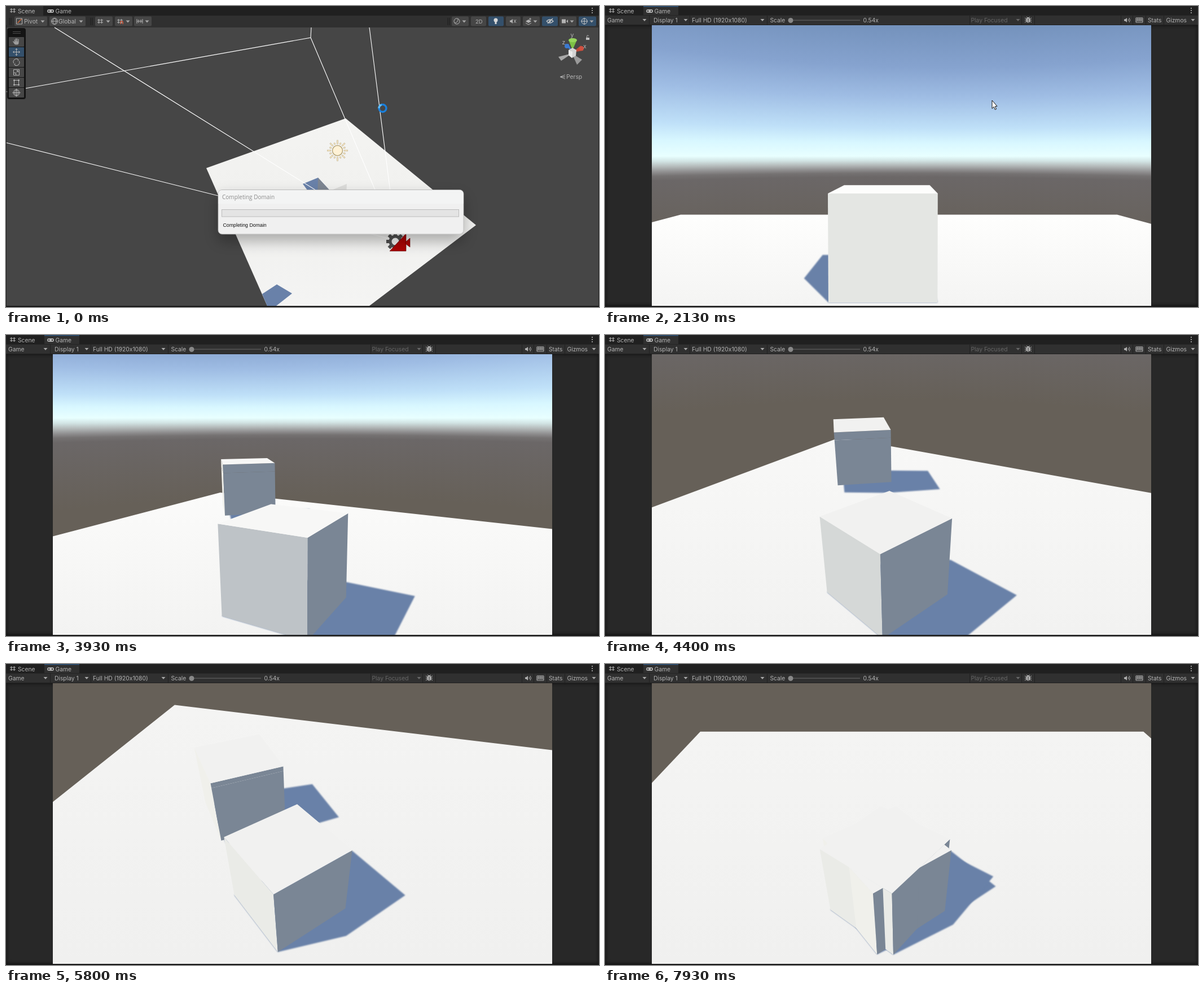
These frames come from a looping animation (1051 by 533 pixels, 8000 ms). An HTML page with a canvas:

```html
<!DOCTYPE html>
<html lang="en">
<head>
<meta charset="utf-8">
<title>Editor play mode</title>
<style>
html, body { margin: 0; width: 100%; height: 100%; overflow: hidden; background: #282828; }
canvas, svg, #frame { position: absolute; left: 0; top: 0; }
#frame { top: 34px; width: 1051px; height: 497px; box-shadow: inset 0 0 6px #0c0c0c; }
canvas { left: 83px; top: 34px; }
text { font: 10.3px Inter, sans-serif; fill: #b4b4b4; }
</style>
</head>
<body>
<div id="frame"></div>
<canvas id="view" width="885" height="497"></canvas>
<svg id="ui" width="1051" height="533" viewBox="0 0 1051 533"></svg>
<script>
const LOOP = 8000, PLAY = 1600, MOVE = 2200;

// ---------- interface ----------
const rect = (x, y, w, h, fill, more = '') => `<rect x="${x}" y="${y}" width="${w}" height="${h}" fill="${fill}" ${more}/>`;
const text = (x, y, s, more = '') => `<text x="${x}" y="${y}" ${more}>${s}</text>`;
const poly = (pts, fill, more = '') => `<polygon points="${pts}" fill="${fill}" ${more}/>`;
const path = (d, stroke = '#b4b4b4', w = 1, more = '') => `<path d="${d}" stroke="${stroke}" stroke-width="${w}" fill="none" ${more}/>`;
const disc = (x, y, r, fill, more = '') => `<circle cx="${x}" cy="${y}" r="${r}" fill="${fill}" ${more}/>`;
const arrow = (x, y, fill = '#a8a8a8') => poly(`${x - 3.5},${y - 2} ${x + 3.5},${y - 2} ${x},${y + 2}`, fill);
const at = (x, y, s) => `<g transform="translate(${x} ${y})">${s}</g>`;
const spokes = (n, draw) => Array.from({ length: n }, (_, i) => `<g transform="rotate(${i * 360 / n})">${draw(i)}</g>`).join('');
const BLUE = '#34506b';

const gridIcon = path('M-2.5-4V4M2.5-4V4M-5-2H5M-5 2H5');
const padIcon = rect(-6, -3, 12, 6, '#b4b4b4', 'rx="3"') + path('M-4.5 0h3M-3-1.5v3', '#222') + disc(3, 0, 1.2, '#222');
const speakerIcon = poly('-5,-1.5 -3,-1.5 0,-4 0,4 -3,1.5 -5,1.5', '#b4b4b4');
const cameraIcon = rect(-5, -3.5, 7, 7, '#b4b4b4') + poly('3,0 6,-3 6,3', '#b4b4b4');
const globeIcon = disc(0, 0, 5.5, 'none', 'stroke="#b4b4b4"') + path('M-5.5 0H5.5M0-5.5C-4-3-4 3 0 5.5C4 3 4-3 0-5.5');
const kebab = [4, 8, 12].map(y => disc(1039, y, 1, '#c0c0c0')).join('');

const tabs = (x, w) => rect(0, 0, 1051, 17, '#202020') + rect(x, 0, w, 17, '#303030') +
  at(12, 8, gridIcon) + text(21, 12.5, 'Scene') + at(79, 9, padIcon) + text(87.5, 12.5, 'Game') + kebab;

// A toolbar button: icon or label, then a drop-down arrow if it has one.
const button = (x, w, content, drop = false, fill = '#464646') =>
  at(x, 27, rect(0, -8.5, w, 17, fill, 'rx="2"') + content + (drop ? arrow(w - 8, 0.5) : ''));
const icon = (x, s) => at(x, 0, s);
const grip = x => path(`M${x} 21v13M${x + 3} 21v13`, '#1c1c1c');

const sceneBar = () => tabs(0, 66) + rect(0, 17, 1051, 21, '#303030') + [6, 150, 783].map(grip).join('') +
  button(15, 58, icon(8.5, path('M-5-5H5V5H-5Z') + path('M-3 3L4-4', '#d0683c', 1.5)) + text(17, 4, 'Pivot'), true) +
  button(77, 64, icon(9, globeIcon) + text(16, 4, 'Global'), true) +
  button(158, 31, icon(9, gridIcon), true) +
  button(193, 31, icon(9, gridIcon + path('M1 5V2a2 2 0 0 1 4 0V5', '#d0583c', 1.5)), true) +
  button(227, 31, icon(10, path('M-5-4V4M5-4V4M-2-3V3M2-3V3M-5 0H5')), true) +
  button(790, 30, icon(9, disc(0, 0, 5, 'none', 'stroke="#b4b4b4"') + path('M2-4A6 6 0 0 1-4 3')), true) +
  button(824, 27, text(8, 4, '2D', 'style="font-size:9.5px"')) +
  button(855, 27, icon(13, disc(0, -2, 3.5, '#d8d8d8') + rect(-1.5, 1, 3, 4, '#d8d8d8')), false, BLUE) +
  button(886, 26, icon(12, speakerIcon + path('M2-3L6 3M6-3L2 3'))) +
  button(916, 30, icon(10, poly('-5,0 0,-3 5,0 0,3', '#b4b4b4') + path('M-5 3L0 6L5 3M3-6v4M1-4h4')), true) +
  button(950, 28, icon(14, path('M-6 0Q0-6 6 0Q0 6-6 0M-4 4L5-5', '#c8c8c8', 1.3) + disc(0, 0, 1.8, '#c8c8c8')), false, BLUE) +
  button(981, 30, icon(9, cameraIcon), true) +
  button(1015, 31, icon(10, disc(0, 0, 5, 'none', 'stroke="#c8c8c8"') + path('M-6 0H6M0-6V6', '#c8c8c8')), true, BLUE);

const toolIcons = [
  rect(-4, -1, 8, 6, '#9c9c9c', 'rx="3"') + path('M-3-4V1M-1-6V0M1-6V0M3.5-5V1M-6-1L-3 3', '#9c9c9c', 1.5),
  spokes(4, () => path('M0 0V-6M-2-4L0-6L2-4')),
  spokes(2, () => path('M-5 2A5.5 5.5 0 0 1 3-5M1-6L4-4L2-2')),
  path('M-5-5H5V5H-5ZM-5 1H-1V5M0 0L3-3M0-3H3V0'),
  path('M-4-4H4V4H-4Z') + spokes(4, () => disc(4, 4, 1.5, '#b4b4b4')),
  globeIcon + path('M-7 0H7M0-7V7')
];
const tools = () => rect(2, 39, 33, 126, '#141414', 'rx="4"') + path('M12 45.5h14M12 48.5h14', '#4c4c4c') +
  toolIcons.map((s, i) => rect(5, 55 + 18 * i, 27, 17, i === 1 ? BLUE : '#464646', 'rx="1"') +
    at(18.5, 63.5 + 18 * i, s)).join('');

const axes = () => poly('1003,84 979,90 984,97', '#a8a8a8') + poly('1003,84 1012,104 1021,95', '#9a9a9a') +
  poly('1004,82 990,68 997,67', '#3c7ad0') + disc(994, 71, 4, '#3c7ad0') +
  poly('1004,82 1019,70 1023,79', '#c04a38') + disc(1020, 75, 4, '#d05040') +
  poly('1004,78 997,60 1012,60', '#7cc045') + '<ellipse cx="1004.5" cy="60.5" rx="7.5" ry="3.5" fill="#96d65c"/>' +
  poly('997,78 1004,74 1011,78 1010,88 1003,92 997,87', '#d4d4d4') + poly('997,78 1004,81 1003,92 997,87', '#ececec') +
  ['x 1023 75', 'y 1000.5 55', 'z 985.5 68'].map(s => s.split(' ')).map(([s, x, y]) => text(x, y, s, 'font-weight="700"')).join('') +
  rect(1028, 56, 6, 4, '#c0c0c0') + path('M1029.5 56V53.5a1.5 1.5 0 0 1 3 0') +
  path('M991 122L982 125.5L991 129M982 125.5H991') + text(993, 129, 'Persp');

const sun = spokes(16, i => path(`M0-11.5V${i % 2 ? -15 : -18.5}`, '#b8a77c', 2.6) + path(`M0-12V${i % 2 ? -14.5 : -18}`, '#fff0d0', 1.4)) +
  disc(0, 0, 9, '#fff2d6', 'stroke="#b8a77c" stroke-width="1.5"');
const gear = spokes(8, () => rect(-3, -16, 6, 7, '#505050')) + disc(0, 0, 9, 'none', 'stroke="#505050" stroke-width="5"');

const sceneView = () => rect(0, 38, 1051, 493, '#464646') +
  poly('355,287 602,199 833,388 644,531 463,531', 'url(#floor)') +
  poly('454,510 480,493 507,509 479,531 463,531', '#6981a9') +
  poly('526,315 553,304 577,330 577,372 548,345', '#6981a9') +
  poly('553,304 576,329 577,372 552,345', '#7d8591') + poly('575,327 604,315 602,356 577,372', '#dcdcda') +
  path('M541 38L540 56L0 152M540 56L692 415M86 38L692 415M644 38L692 415M0 242L692 415', '#fff', 1.1) +
  at(587.5, 256, sun) + at(690, 417, gear) +
  poly('680,434 709,403 709,434', '#aa0404', 'stroke="#5a0000" stroke-width=".6"') +
  poly('708,418 716,411 716,427 708,421', '#aa0404', 'stroke="#5a0000" stroke-width=".6"') +
  tools() + axes();

const dialog = () => '<g id="dialog"><g filter="url(#drop)">' +
  rect(376, 325.5, 435, 78.5, '#f0f0f0', 'rx="7" stroke="#a8a8a8" stroke-width=".7"') + '</g>' +
  '<path d="M376.5 350V333q0-7 7-7h420q7 0 7 7v17z" fill="#f3f4f4"/>' +
  text(383, 342, 'Completing Domain', 'style="font:10px \'Open Sans\',sans-serif;fill:#8c8c8c"') +
  rect(382.5, 360.5, 420, 12.5, '#e4e4e4', 'stroke="#bcbcbc"') +
  text(384.5, 391, 'Completing Domain', 'style="font:8.8px \'Liberation Sans\',sans-serif;fill:#101010"') + '</g>';

const gameBar = () => tabs(68, 62) + rect(68, 0, 62, 1.5, '#2a5078') + rect(0, 17, 1051, 17, '#303030') +
  rect(0, 33, 1051, 1, '#202020') + rect(0, 16, 1051, 1, '#242424') +
  [78, 150, 287, 646, 738, 761, 914, 935, 958, 990].map(x => rect(x, 17, 1, 17, '#212121')).join('') +
  [70, 143, 279, 1042].map(x => arrow(x, 25)).join('') + arrow(732, 25, '#686868') +
  text(4, 29, 'Game') + text(86, 29, 'Display 1') + text(154, 29, 'Full HD (1920x1080)') +
  text(292.5, 29, 'Scale') + text(457.5, 29, '0.54x') + text(962, 29, 'Stats') + text(994.5, 29, 'Gizmos') +
  text(648.5, 29, 'Play Focused', 'style="fill:#666"') +
  rect(329, 24.5, 123, 1.5, '#555') + disc(329, 25.5, 4.5, '#888') +
  at(750, 25, '<ellipse rx="3.5" ry="5" fill="#b4b4b4"/>' + path('M-6-4L6 4M-6 4L6-4M-6 0H6M-3-6L0-3L3-6') + path('M0-3V5', '#303030')) +
  at(925, 25, speakerIcon + path('M2-2Q4 0 2 2M4-4Q7 0 4 4')) +
  at(947, 25, path('M-6-4H6V4H-6ZM-6-1.3H6M-6 1.3H6M-3-4V1M0-4V1M3-4V1'));

ui.innerHTML = `<defs><linearGradient id="floor" x2="0" y2="1"><stop stop-color="#f4f4f2"/><stop offset=".5" stop-color="#f0f0ee"/>
  <stop offset="1" stop-color="#f4f4f3"/></linearGradient><filter id="drop" x="-10%" y="-30%" width="120%" height="190%">
  <feDropShadow dx="0" dy="12" stdDeviation="13" flood-opacity=".3"/></filter></defs>
  <g id="scene">${sceneBar()}${sceneView()}${dialog()}</g><g id="game">${gameBar()}</g>
  ${rect(0, 531, 1051, 2, '#161616')}${rect(0, 34, 1, 497, '#1c1c1c')}${rect(1050, 34, 1, 497, '#1c1c1c')}
  <g id="spinner">${disc(0, 0, 6.5, 'none', 'stroke="#1a80dc" stroke-width="3.4"')}${path('M-6.5 0A6.5 6.5 0 0 1-2-6.2', '#62bdf8', 3.4)}</g>
  <g id="pointer">${poly('686,167 686,181.5 689.2,178.5 691.3,183.5 693.5,182.5 691.4,177.8 695,177.5', '#fff', 'stroke="#111"')}</g>`;

// ---------- game world: y is up, the floor is 10 by 10, boxes have side 1 ----------
const ctx = view.getContext('2d');
const CX = 525.5, CY = 282.5, FOCAL = 683, RADIUS = 4, SIDE = 0.17;
const SHADOW = [-0.4, 0.7];                 // ground shift of a shadow per unit of height
const rad = deg => deg * Math.PI / 180;
const lerp = (a, b, u) => a + (b - a) * u;
const dot = (a, b) => a[0] * b[0] + a[1] * b[1] + a[2] * b[2];
const sunLength = Math.hypot(...SHADOW, 1);
const toSun = [-SHADOW[0] / sunLength, 1 / sunLength, -SHADOW[1] / sunLength];

// Orbit angles of the camera, then place and heading of the player.
const keys = [
  { t: MOVE, yaw: 0, pitch: 1.4, x: -0.11, z: 0.2, turn: 0 },
  { t: 2870, yaw: -80.6, pitch: 7.9, x: -0.18, z: 0.1, turn: 0 },
  { t: 3930, yaw: -117.3, pitch: 11.2, x: -0.11, z: -0.09, turn: 0 },
  { t: 5070, yaw: -125.8, pitch: 42.8, x: 0, z: -0.61, turn: 38.5 },
  { t: 6330, yaw: -90, pitch: 38.7, x: -0.03, z: -0.63, turn: 38.5 },
  { t: 7930, yaw: -90, pitch: 38.3, x: -0.03, z: -0.63, turn: 38.5 }
];
function poseAt(t) {
  const i = Math.max(1, keys.findIndex(k => k.t >= t));
  const a = keys[i - 1], b = t > keys.at(-1).t ? a : keys[i];
  const u = Math.max(0, (t - a.t) / (b.t - a.t || 1));
  if (t >= keys.at(-1).t) return keys.at(-1);
  return Object.fromEntries(Object.keys(a).map(k => [k, lerp(a[k], b[k], u)]));
}

let cam;
function aim({ yaw, pitch, x, z }) {
  const s = Math.sin(rad(yaw)), c = Math.cos(rad(yaw)), sp = Math.sin(rad(pitch)), cp = Math.cos(rad(pitch));
  cam = { s, c, sp, cp, yaw, pitch, horizon: CY - FOCAL * sp / cp,
    pos: [x + SIDE * c - RADIUS * cp * s, 1.24 + (RADIUS + 0.07) * sp, z - SIDE * s - RADIUS * cp * c] };
}
function toCamera(p) {
  const [x, y, z] = p.map((v, i) => v - cam.pos[i]);
  const ahead = x * cam.s + z * cam.c;
  return [x * cam.c - z * cam.s, y * cam.cp + ahead * cam.sp, ahead * cam.cp - y * cam.sp];
}

// Keeps the part of a polygon where side(point) is not negative.
function clip(pts, side) {
  return pts.flatMap((p, i) => {
    const q = pts[(i + 1) % pts.length], a = side(p), b = side(q);
    const kept = a >= 0 ? [p] : [];
    if (a * b < 0) kept.push(p.map((v, j) => lerp(v, q[j], a / (a - b))));
    return kept;
  });
}
const project = pts => clip(pts.map(toCamera), p => p[2] - 0.1)
  .map(([x, y, z]) => [CX + FOCAL * x / z, CY - FOCAL * y / z]);
function fill(screen, style) {
  ctx.beginPath();
  screen.forEach(p => ctx.lineTo(...p));
  ctx.fillStyle = style;
  ctx.fill();
}

function makeBox(x, y, z, turn) {
  const s = Math.sin(rad(turn)) / 2, c = Math.cos(rad(turn)) / 2;
  const ring = h => [[-1, -1], [1, -1], [1, 1], [-1, 1]].map(([a, b]) => [x + a * c + b * s, y + h, z - a * s + b * c]);
  const base = ring(0), top = ring(1);
  const faces = base.map((p, i) => {
    const j = (i + 1) % 4;
    return { pts: [p, base[j], top[j], top[i]], n: [p[0] + base[j][0] - 2 * x, 0, p[2] + base[j][2] - 2 * z] };
  });
  faces.push({ pts: top, n: [0, 1, 0] });
  return { corners: [...base, ...top], faces: faces.filter(f => above(f, cam.pos) > 0) };
}
const above = (face, p) => dot(face.n, p) - dot(face.n, face.pts[0]);

function faceColor({ n }) {
  if (n[1]) {
    const v = 254 - 13 * Math.min(1, cam.pitch / 20);
    return `rgb(${v},${v},${v - 1})`;
  }
  const lit = Math.min(1, (Math.max(0, dot(n, toSun)) / 0.62) ** 0.8);
  return `rgb(${[[122, 240], [134, 240], [149, 235]].map(([a, b]) => lerp(a, b, lit))})`;
}
const drawFace = (face, pts = face.pts) => fill(project(pts), faceColor(face));

// Parts beyond a visible plane of the near box come after it, the rest before.
function drawBoxes(near, far) {
  const later = [];
  for (const face of far.faces) {
    let rest = face.pts;
    for (const plane of near.faces) {
      later.push([face, clip(rest, p => above(plane, p))]);
      rest = clip(rest, p => -above(plane, p));
    }
    drawFace(face, rest);
  }
  near.faces.forEach(f => drawFace(f));
  later.forEach(part => drawFace(...part));
}

function hull(pts) {
  const turn = (a, b, c) => (b[0] - a[0]) * (c[2] - a[2]) - (b[2] - a[2]) * (c[0] - a[0]);
  const chain = list => list.reduce((h, p) => {
    while (h.length > 1 && turn(h.at(-2), h.at(-1), p) <= 0) h.pop();
    return [...h, p];
  }, []).slice(0, -1);
  const sorted = pts.sort((a, b) => a[0] - b[0] || a[2] - b[2]);
  return [...chain(sorted), ...chain(sorted.slice().reverse())];
}
function drawShadow({ corners }) {
  const ground = corners.map(([x, y, z]) => [x + y * SHADOW[0], 0, z + y * SHADOW[1]]);
  fill(project(hull(ground)), '#6981a8');
}

// Colours by height below the horizon; the sky is lighter where the shadows point.
const sky = [[-300, '#6984ad'], [-232, '#7391bb'], [-156, '#86a3cf'], [-103, '#9fbde4'], [-49, '#bfe0f8'], [-23, '#d8f7ff'],
  [0, '#e8ffff'], [8, '#d2e4e4'], [16, '#b4baba'], [24, '#8f8e8f'], [30, '#757272'], [37, '#6b6767'], [140, '#666058']];
function drawSky() {
  const glow = Math.atan2(...SHADOW);
  for (let x = 83; x < 968; x += 4) {
    const off = (x + 2 - CX) / FOCAL, bend = Math.hypot(1, off);
    const lean = 0.84 + 0.2 * Math.cos(rad(cam.yaw) + Math.atan(off) - glow);
    const g = ctx.createLinearGradient(0, cam.horizon - 400 * bend, 0, cam.horizon + 140 * bend);
    for (const [d, c] of sky) g.addColorStop(((d < 0 ? d * lean : d) + 400) / 540, c);
    ctx.fillStyle = g;
    ctx.fillRect(x, 34, 4, 497);
  }
}

function drawFloor() {
  const pts = project([[-5, 0, -5], [5, 0, -5], [5, 0, 5], [-5, 0, 5]]);
  const steep = Math.min(1, cam.pitch / 40);
  const g = ctx.createLinearGradient(0, Math.max(34, Math.min(...pts.map(p => p[1]))), 0, 531);
  [254 - 10 * steep, 244 - 4 * steep].forEach((v, i) => g.addColorStop(i, `rgb(${v},${v},${v - 1})`));
  fill(pts, g);
}

function drawGame(t) {
  const pose = poseAt(t);
  aim(pose);
  // The other box floats up to the player, always facing it.
  const gap = Math.max(0, 1.2 * (7.35 - t / 1000)), heading = 53 - gap;
  const player = makeBox(pose.x, 0, pose.z, pose.turn);
  const other = makeBox(pose.x - gap * Math.sin(rad(heading)), 0.04 * gap, pose.z - gap * Math.cos(rad(heading)), heading);
  ctx.setTransform(1, 0, 0, 1, -83, -34);
  drawSky();
  drawFloor();
  ctx.filter = 'blur(0.8px)';
  drawShadow(other);
  drawShadow(player);
  ctx.filter = 'none';
  drawBoxes(player, other);
}

// ---------- timeline ----------
const el = id => document.getElementById(id);
const show = (id, on) => { el(id).style.display = on ? '' : 'none'; };

function draw(now) {
  const t = now % LOOP, playing = t >= PLAY;
  show('scene', !playing);
  show('game', playing);
  show('view', playing);
  show('dialog', t < 670);
  show('spinner', t < 1470);
  show('pointer', t >= 1470 && t < 2270);
  const [x, y] = t < 70 ? [667.5, 181] : t < 470 ? [679, 174] : [688, t < 670 ? 166 : 169];
  el('spinner').setAttribute('transform', `translate(${x} ${y}) rotate(${Math.max(0, t - 670) * 0.36})`);
  if (playing) drawGame(t);
  requestAnimationFrame(draw);
}
requestAnimationFrame(draw);
</script>
</body>
</html>
```
